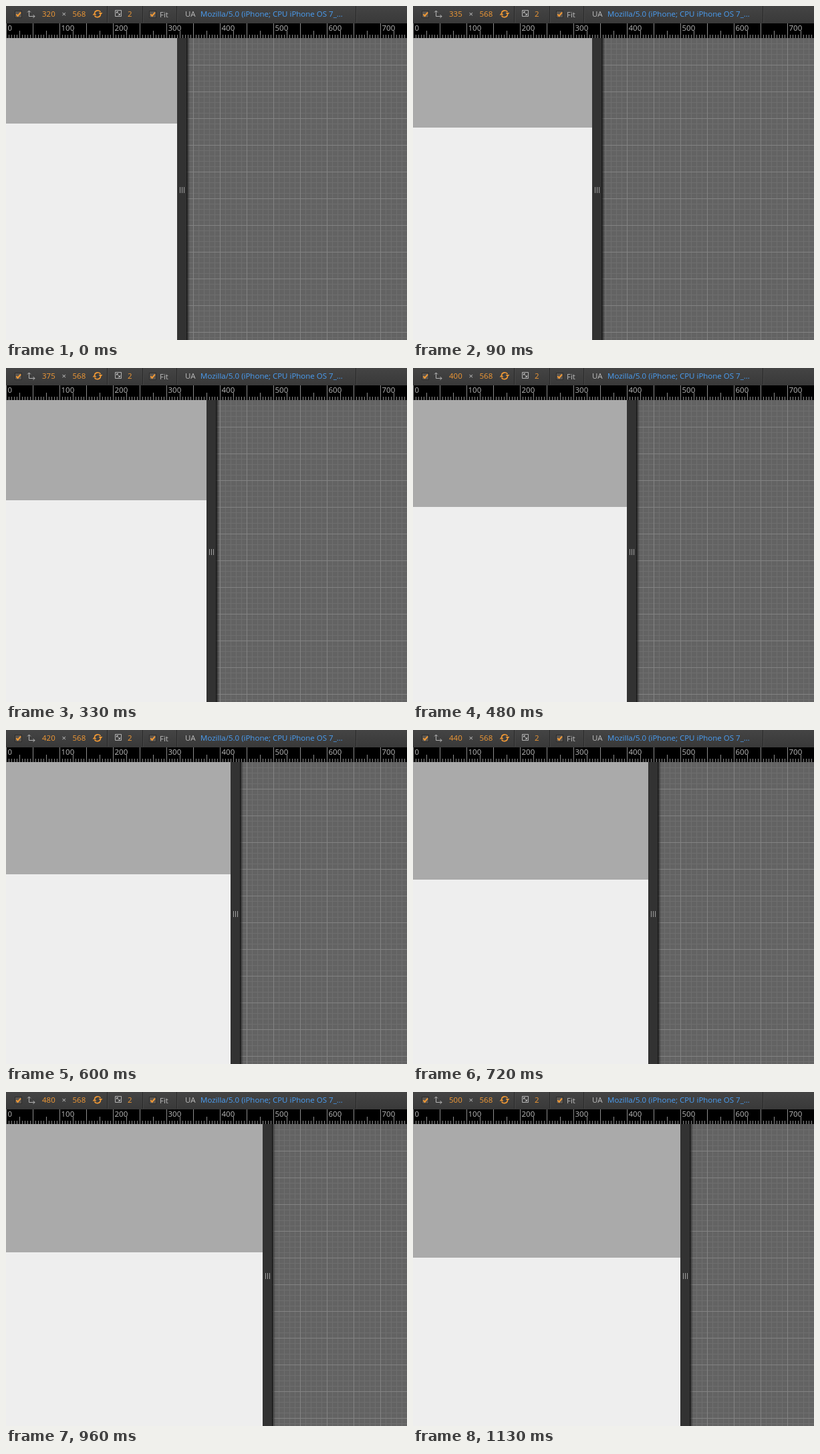
An HTML page for the animation above (1.18 s loop, 600 by 500 pixels).

```html
<!DOCTYPE html>
<html lang="en">
<head>
<meta charset="utf-8">
<title>Viewport resizer</title>
<style>
  html, body { margin: 0; width: 100%; height: 100%; overflow: hidden; background: #636363; }
  svg { display: block; width: 600px; height: 500px; }
  text { font: 11.5px "Open Sans", "Noto Sans", sans-serif; fill: #bcbcbc; white-space: pre; }
  .orange { fill: #f39a35; }
  .blue { fill: #4a9ff5; }
  .line { fill: none; stroke: #b4b4b4; }
</style>
</head>
<body>
<svg viewBox="0 0 600 500">
  <defs>
    <linearGradient id="bar" x2="0" y2="1">
      <stop offset="0" stop-color="#444"/>
      <stop offset="1" stop-color="#393939"/>
    </linearGradient>
    <linearGradient id="shade">
      <stop offset="0" stop-color="#000" stop-opacity=".85"/>
      <stop offset=".4" stop-color="#000" stop-opacity=".45"/>
      <stop offset="1" stop-color="#000" stop-opacity="0"/>
    </linearGradient>
    <g id="check">
      <rect x=".5" y=".5" width="10" height="10" fill="#5a5550" stroke="#2e2e2e"/>
      <path d="M2.4 5.4 4.6 8 9 2.6" fill="none" stroke="#f39a35" stroke-width="2"/>
    </g>
  </defs>

  <rect y="48" width="600" height="452" fill="#636363"/>
  <path id="minor" stroke="#6e6e6e"/>
  <path id="major" stroke="#838383"/>

  <rect id="page" y="48" height="452" fill="#eee"/>
  <rect id="banner" y="48" fill="#aaa"/>
  <g id="handle">
    <rect y="48" width="14" height="452" fill="#323232"/>
    <rect x="14" y="48" width="5" height="452" fill="url(#shade)"/>
    <path d="M4.5 271v9M7.5 271v9M10.5 271v9" stroke="#a0a0a0"/>
  </g>

  <rect y="26" width="600" height="22" fill="#000"/>
  <path id="ticks" stroke="#8c8c8c"/>
  <g id="labels"></g>

  <rect width="600" height="26" fill="url(#bar)"/>
  <path d="M151.5 0v25M204.5 0v25M255.5 0v25M523.5 0v25" stroke="#292929"/>
  <path d="M152.5 0v25M205.5 0v25M256.5 0v25M524.5 0v25" stroke="#484848"/>
  <use href="#check" x="13" y="7"/>
  <use href="#check" x="214" y="7"/>
  <path class="line" d="M34.5 7v8.5H43M32 9.5 34.5 7 37 9.5M40.5 13 43 15.5 40.5 18"/>
  <g fill="none" stroke="#f39a35" stroke-width="1.6">
    <path d="M132.5 10.5A5 5 0 0 1 141.5 9M141.5 13A5 5 0 0 1 132.5 14.5"/>
    <path fill="#f39a35" stroke="none" d="M138.5 10h6l-3 3.5zM129.5 13.5h6l-3-3.5z"/>
  </g>
  <path class="line" d="M163.5 6.5h9v9h-9zM166 9l4.5 4.5M165.5 11V8.500h2.500M170.500 11v2.500H168"/>
  <text id="width" class="orange" x="54" y="16"></text>
  <text x="83.500" y="16">×</text>
  <text class="orange" x="99.500" y="16">568</text>
  <text class="orange" x="182" y="16">2</text>
  <text x="230" y="17">Fit</text>
  <text x="268" y="16">UA</text>
  <text class="blue" x="291" y="16">Mozilla/5.0 (iPhone; CPU iPhone OS 7_…</text>
</svg>
<script>
const $ = id => document.getElementById(id);
const set = (el, attrs) => Object.entries(attrs).forEach(([k, v]) => el.setAttribute(k, v));

const SCALE = 0.8, TOP = 48, LOOP = 1180;

function gridPath(step, keep) {
  let d = '';
  for (let p = 0; p < 600; p += step) {
    if (!keep(p)) continue;
    d += `M${p + .5} ${TOP}V500`;
    if (p && TOP + p < 500) d += `M0 ${TOP + p + .5}H600`;
  }
  return d;
}

function buildRuler() {
  let d = '';
  for (let x = 0; x < 600; x += 4) {
    const h = x % 40 === 0 ? 22 : x % 20 === 0 ? 11 : 5;
    d += `M${x + .5} ${TOP}v${-h}`;
    if (x % 80) continue;
    const label = document.createElementNS('http://www.w3.org/2000/svg', 'text');
    set(label, { x: x + 2.5, y: 37 });
    label.textContent = x / SCALE;
    $('labels').append(label);
  }
  set($('ticks'), { d });
}

// 30 ms per step, slowing to 40 ms and then 50 ms at the end
function stepAt(t) {
  if (t < 960) return Math.floor(t / 30);
  if (t < 1080) return 32 + Math.floor((t - 960) / 40);
  return t < 1130 ? 35 : 36;
}

function draw() {
  const t = (performance.now() - start) % LOOP;
  const w = 320 + 5 * stepAt(t);
  const edge = w * SCALE;
  set($('page'), { width: edge });
  set($('banner'), { width: edge, height: edge / 2 });
  set($('handle'), { transform: `translate(${edge})` });
  $('width').textContent = w;
  requestAnimationFrame(draw);
}

set($('minor'), { d: gridPath(8, p => p % 40) });
set($('major'), { d: gridPath(40, () => true) });
buildRuler();
const start = performance.now();
draw();
</script>
</body>
</html>
```
